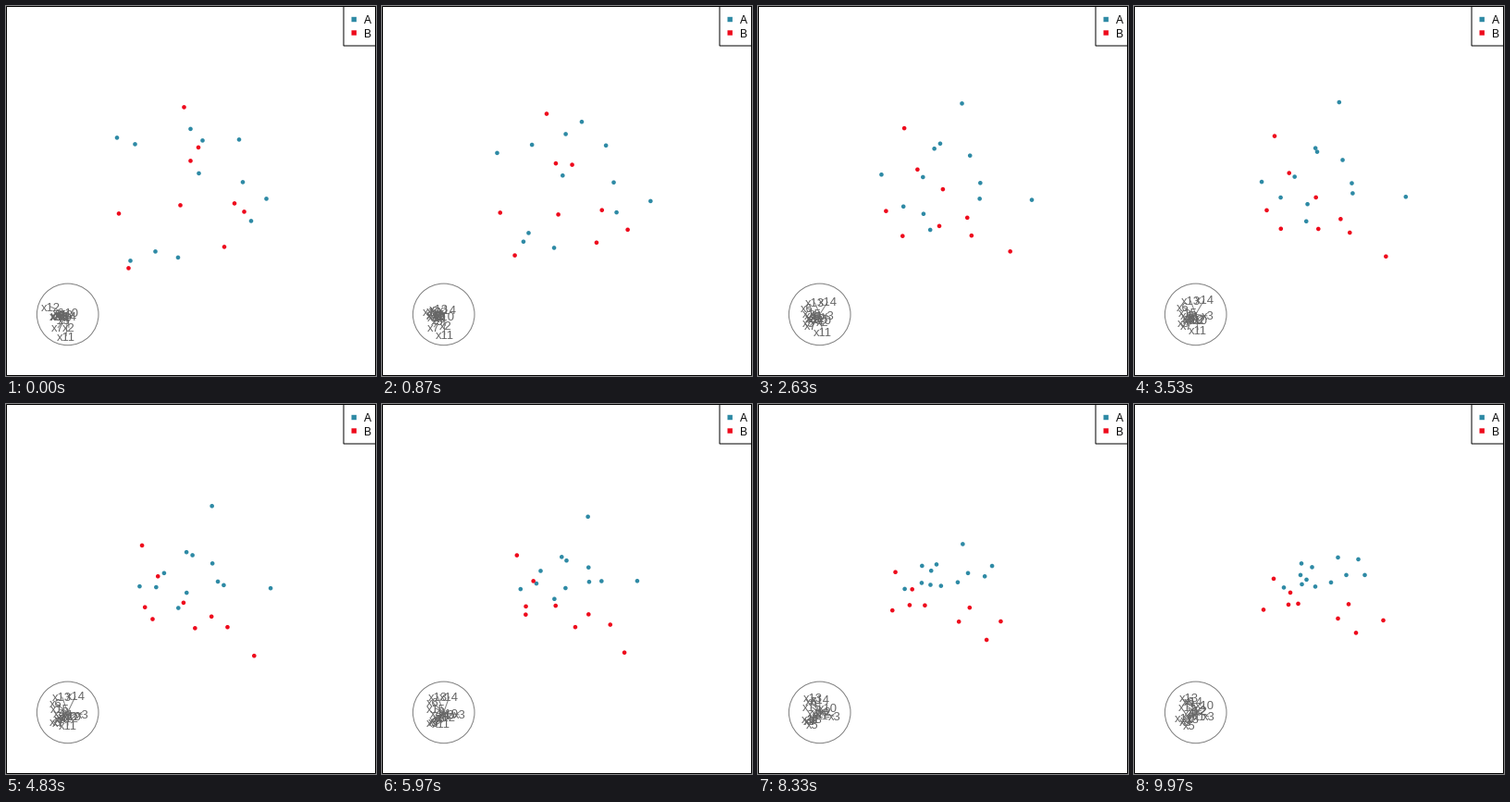
A matplotlib script for the animation above (10000 ms loop, 400x400 px).

```python
import numpy as np
import matplotlib.pyplot as plt
from matplotlib.animation import FuncAnimation
from matplotlib.collections import LineCollection
from matplotlib.patches import Circle, Rectangle

SIZE, FRAMES = 400, 300
PT = 0.72  # points per pixel at 100 dpi
TEAL, RED = "#2e8aa5", "#ee0a1c"
GREY, LABEL = "#7f7f7f", "#666666"
HUB = np.array([66.7, 333.4])
rng = np.random.default_rng(4)


def curve(*points):
    """Arc through a start, an optional middle and an end point."""
    points = np.array(points, float)
    start, end = points[0], points[-1]
    straight = (start + end) / 2
    bend = points[1] - straight if len(points) == 3 else 0 * straight
    return lambda s: start * (1 - s) + end * s + 4 * s * (1 - s) * bend


def drift():
    """Wandering of an axis that stays close to the hub."""
    return curve(*(HUB + (-4, 1) + rng.normal(0, (5, 4), (2, 2))))


GROUPS = {
    "A": (TEAL, [
        curve((120, 143), (139, 192), (162, 199)),
        curve((139.5, 150), (199, 159), (180, 185.5)),
        curve((199.5, 133.5), (192.5, 177)),
        curve((212.5, 146), (222, 105), (220.5, 166.5)),
        curve((252, 145), (225, 168), (229.5, 185.5)),
        curve((208.5, 181.5), (173, 185), (181, 173)),
        curve((256, 191), (213, 193.5)),
        curve((281.5, 209), (293, 206), (242.5, 168.5)),
        curve((265, 233), (236, 202), (249.5, 185.5)),
        curve((161.5, 266), (159, 206), (181.5, 195.5)),
        curve((186, 272.5), (186.5, 190.5)),
        curve((134.5, 276), (189, 213), (196, 198)),
    ]),
    "B": (RED, [
        curve((192.5, 110), (151, 143), (151, 189.5)),
        curve((208, 153.5), (196, 209), (177.5, 216.5)),
        curve((199.5, 168), (167, 182), (169, 204.5)),
        curve((188.5, 216), (200, 242), (220.5, 232.5)),
        curve((122, 225), (167, 217.5)),
        curve((247, 214), (223, 231), (232, 217)),
        curve((257.5, 223), (272, 272), (240, 248)),
        curve((236, 261), (234, 245), (269.5, 234.5)),
        curve((132.5, 284), (159, 240), (140, 223)),
    ]),
}

# Only the long axes have set paths; the short ones drift.
LONG_AXES = {
    2: curve((68, 348), (73, 331)),
    3: curve((54, 336), (80, 335), (81, 338)),
    5: curve((63, 340), (54, 343), (60, 347)),
    6: curve((57, 331), (53, 325), (59, 321)),
    7: curve((56, 348), (57, 342)),
    10: curve((68, 332), (70, 339), (76, 325)),
    11: curve((65, 357), (69, 350), (54, 339)),
    12: curve((48, 325), (66, 339), (68, 332)),
    13: curve((62, 333), (61, 318), (59, 318)),
    14: curve((66, 335), (76, 317), (64, 321)),
    15: curve((58, 335), (58, 327)),
}
AXES = [LONG_AXES.get(n) or drift() for n in range(1, 16)]

fig = plt.figure(figsize=(4, 4), dpi=100, facecolor="white")
ax = fig.add_axes([0, 0, 1, 1])
ax.set(xlim=(0, SIZE), ylim=(SIZE, 0))
ax.axis("off")


def box(x, y, w, h, **style):
    ax.add_patch(Rectangle((x, y), w, h, snap=False, **style))


def write(x, y, text, size, **style):
    return ax.text(x, y, text, family="Liberation Sans", fontsize=size * PT,
                   va="baseline", **style)


outline = dict(fill=False, ec="black", lw=PT)
box(0.5, 0.5, 399, 399, **outline)
box(365, 0.5, 34.5, 42.5, **outline)

ax.add_patch(Circle(HUB, 33.3, fill=False, ec=GREY, lw=PT))
spokes = LineCollection([], colors=GREY, linewidths=PT)
ax.add_collection(spokes)
labels = [write(*HUB, f"x{n}", 13, color=LABEL, ha="center")
          for n in range(1, len(AXES) + 1)]

clouds = []
for row, (name, (color, paths)) in enumerate(GROUPS.items()):
    y = 14.5 + 14.5 * row
    box(373.5, y - 2.7, 5.4, 5.4, fc=color, ec="none")
    write(387, y + 4.5, name, 12, color="black")
    dots = ax.scatter([], [], s=(4.6 * PT) ** 2, c=color, edgecolors="none",
                      zorder=5, snap=False)
    clouds.append((dots, paths))


def draw(frame):
    # The tour turns fast at first and then settles.
    s = 1 - (1 - frame / (FRAMES - 1)) ** 1.5
    for dots, paths in clouds:
        dots.set_offsets([path(s) - (0, 0.6) for path in paths])
    tips = [path(s) for path in AXES]
    spokes.set_segments([(HUB, tip) for tip in tips])
    for label, (x, y) in zip(labels, tips):
        label.set_position((x, y + 4.5))
    return [spokes, *labels, *(dots for dots, _ in clouds)]


anim = FuncAnimation(fig, draw, frames=FRAMES, interval=10000 / FRAMES,
                     repeat=True, repeat_delay=0, blit=False)
plt.show()
```
